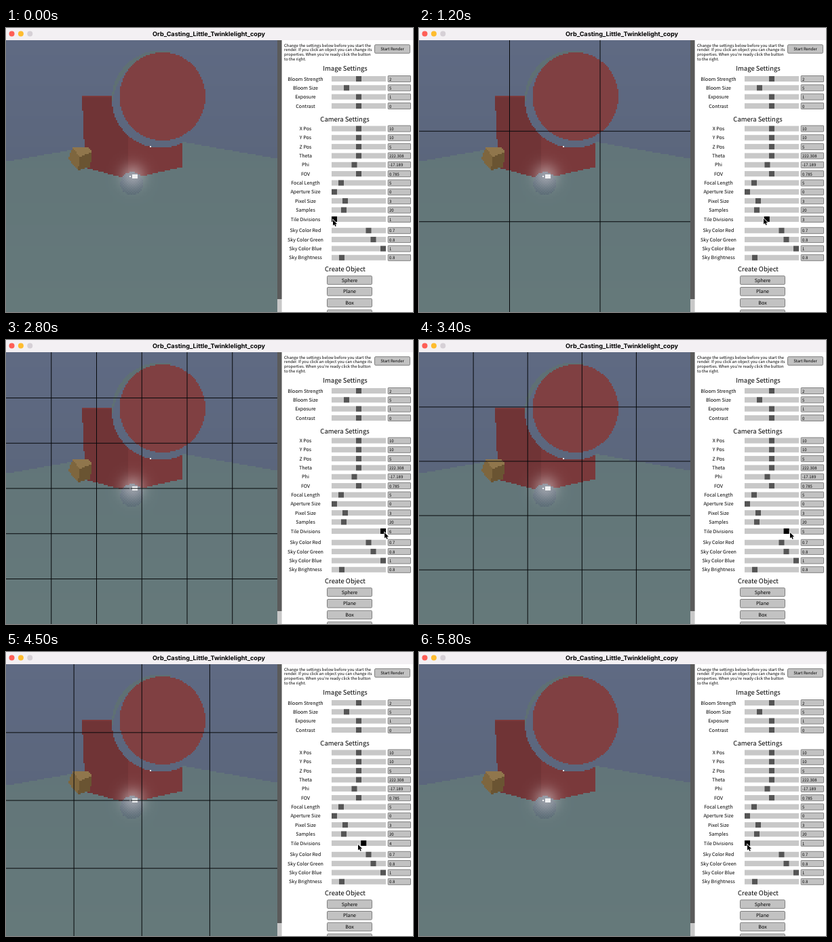
Write an HTML page with a canvas that moves like this. It is 600x419 px and loops after 5900 ms.

```html
<!DOCTYPE html>
<html lang="en">
<head>
<meta charset="utf-8">
<title>Render settings</title>
<style>
  html, body { margin: 0; width: 100%; height: 100%; overflow: hidden; background: #fff; }
  canvas { display: block; width: 600px; height: 419px; }
</style>
</head>
<body>
<canvas id="stage" width="600" height="419"></canvas>
<script>
const W = 600, H = 419, LOOP = 5900, STEP = 100;
const VIEW = 400, TOP = 18, CELL = 2;
const SANS = '"Noto Sans CJK JP", "Noto Sans CJK SC", "Noto Sans CJK", "Open Sans", sans-serif';
const TITLE = 'Orb_Casting_Little_Twinklelight_copy';
const TILE_Y = 282;

const ctx = document.getElementById('stage').getContext('2d');

// label, y, handle centre, value
const sliders = [
  ['Bloom Strength', 75, 520, '2'],
  ['Bloom Size', 88.3, 502, '5'],
  ['Exposure', 101.6, 520, '1'],
  ['Contrast', 115, 520, '0'],
  ['X Pos', 148.5, 520, '10'],
  ['Y Pos', 161.8, 520, '10'],
  ['Z Pos', 175.1, 520, '5'],
  ['Theta', 188.5, 520, '222.308'],
  ['Phi', 201.8, 513.5, '-17.189'],
  ['FOV', 215.1, 520, '0.785'],
  ['Focal Length', 228.5, 494, '5'],
  ['Aperture Size', 241.8, 484, '0'],
  ['Pixel Size', 255.1, 500, '3'],
  ['Samples', 268.5, 498, '20'],
  ['Sky Color Red', 298.8, 534.5, '0.7'],
  ['Sky Color Green', 312.1, 541.5, '0.8'],
  ['Sky Color Blue', 325.5, 556, '1'],
  ['Sky Brightness', 338.8, 495, '0.8']
];

// time, x, y of the pointer tip
const path = [
  [0, 482, 283], [1200, 508, 281], [2000, 536, 282], [2700, 558, 284],
  [2900, 558, 284], [3200, 550, 284], [3300, 548, 284], [3400, 547, 284],
  [4500, 519, 284], [5650, 484, 284], [LOOP, 484, 284]
];

const mix = (a, b, k) => a.map((v, i) => v + (b[i] - v) * k);
const inDisc = (x, y, cx, cy, rx, ry = rx) => Math.hypot((x - cx) / rx, (y - cy) / ry) < 1;
const inBox = (x, y, l, t, r, b) => x > l && x < r && y > t && y < b;

function inPoly(x, y, pts) {
  let inside = false;
  for (let i = 0, j = pts.length - 1; i < pts.length; j = i++) {
    const [ax, ay] = pts[i], [bx, by] = pts[j];
    if ((ay > y) !== (by > y) && x < (bx - ax) * (y - ay) / (by - ay) + ax) inside = !inside;
  }
  return inside;
}

const block = [[112, 100], [157, 100], [260, 130], [260, 205], [181, 223], [117, 206]];
const crate = [
  [[[92, 193], [98, 177], [109, 190], [106, 210]], [126, 102, 62]],
  [[[98, 177], [120, 175], [127, 183], [109, 190]], [144, 118, 76]],
  [[[109, 190], [127, 183], [124, 205], [106, 210]], [106, 84, 50]]
];

function surface(x, y) {
  const sky = mix([95, 106, 131], [91, 102, 124], (y - TOP) / 180);
  if (inDisc(x, y, 185.5, 229.5, 17)) {
    const dots = (Math.floor(x / CELL) + Math.floor(y / CELL)) % 2 ? 2 : -2;
    return mix([100, 112, 128], [88, 106, 115], (y - 213) / 34).map(v => v + dots);
  }
  if (inDisc(x, y, 230.7, 101, 63.3, 65)) return [128, 64, 66];
  if (inDisc(x, y, 228, 105, 72)) {
    return inDisc(x, y, 241, 120, 85) ? sky : [95, 112, 116];
  }
  for (const [pts, color] of crate) if (inPoly(x, y, pts)) return color;
  if (inPoly(x, y, block)) {
    if (y < 102) return [124, 58, 59];
    return x < 181 ? [112, 52, 54] : [122, 57, 59];
  }
  const horizon = 159.4 + Math.abs(x - 212) * 0.178;
  return y > horizon ? mix([98, 117, 121], [101, 121, 122], (y - 165) / 250) : sky;
}

function shade(x, y) {
  if (inBox(x, y, 186, 216, 194, 222) || inBox(x, y, 182, 218, 184, 220)) return [240, 241, 243];
  if (inDisc(x, y, 213, 175, 1.2)) return [250, 245, 245];
  const d = Math.hypot(x - 187, y - 218);
  return mix(surface(x, y), [226, 220, 222], 0.44 * Math.exp(-d * d / 330));
}

function renderScene() {
  const cols = VIEW / CELL, rows = cols + 1;
  const pic = document.createElement('canvas');
  pic.width = cols;
  pic.height = rows;
  const g = pic.getContext('2d');
  const img = g.createImageData(cols, rows);
  for (let r = 0; r < rows; r++) {
    for (let c = 0; c < cols; c++) {
      const color = shade((c + 0.5) * CELL, TOP + (r + 0.5) * CELL);
      img.data.set([...color.map(Math.round), 255], (r * cols + c) * 4);
    }
  }
  g.putImageData(img, 0, 0);
  return pic;
}

function rect(x, y, w, h, color) {
  ctx.fillStyle = color;
  ctx.fillRect(x, y, w, h);
}

function text(str, x, y, size, align = 'center', font = SANS, weight = 400) {
  ctx.font = `${weight} ${size}px ${font}`;
  ctx.textAlign = align;
  ctx.textRendering = 'geometricPrecision';
  ctx.fillStyle = '#000';
  ctx.fillText(str, x, y);
}

function panelBox(x, y, w, h, r) {
  ctx.beginPath();
  ctx.roundRect(x + 0.5, y + 0.5, w - 1, h - 1, r);
  ctx.fillStyle = '#c2c2c2';
  ctx.fill();
  ctx.strokeStyle = '#808080';
  ctx.lineWidth = 1;
  ctx.stroke();
}

function button(label, x, y, w, size) {
  panelBox(x, y, w, 13.5, 1.5);
  text(label, x + w / 2, y + 6.7 + size * 0.36, size);
}

function slider(label, y, handle, value, color = '#555') {
  const top = y - 4;
  text(label, 441.5, y + 2.5, 7.14);
  rect(480, top, 80, 8, '#c8c8c8');
  rect(handle - 4, top, 8, 8, color);
  panelBox(562.7, top - 1, 34.3, 10, 0.5);
  text(value, 565, y + 2.5, 5.95, 'left');
}

function drawPanel() {
  rect(400, TOP, 7, H - TOP, '#5a5a5a');
  rect(400, 400, 7, H - 400, '#c8c8c8');
  rect(406.6, TOP, W - 406.6, H - TOP, '#fff');
  [
    'Change the settings below before you start the',
    'render. If you click an object you can change its',
    'properties. When you\u2019re ready click the button',
    'to the right.'
  ].forEach((line, i) => text(line, 410, 27.6 + i * 6.67, 5.95, 'left'));
  button('Start Render', 543, 24.2, 53, 5.95);
  text('Image Settings', 500, 63.3, 9.5);
  text('Camera Settings', 499.5, 138.2, 9.5);
  text('Create Object', 500, 358.8, 9.5);
  sliders.forEach(s => slider(...s));
  ['Sphere', 'Plane', 'Box'].forEach((name, i) =>
    button(name, 473, 365.3 + i * 16.7, 67, 7.14));
  panelBox(473, 415.4, 67, 14, 1.5);
}

function drawTitleBar() {
  rect(0, 0, W, TOP, '#f3f0f3');
  ['#fe5f57', '#febc2e', '#d6d0d6'].forEach((color, i) => {
    ctx.beginPath();
    ctx.arc(8.5 + i * 13.4, 8.5, 4, 0, Math.PI * 2);
    ctx.fillStyle = color;
    ctx.fill();
  });
  text(TITLE, 299, 11.5, 9.1, 'center', 'Inter, "Open Sans", sans-serif', 700);
}

function pointerAt(t) {
  const i = Math.max(1, path.findIndex(p => p[0] >= t));
  const a = path[i - 1], b = path[i];
  const k = (t - a[0]) / (b[0] - a[0]);
  return [a[1] + (b[1] - a[1]) * k, a[2] + (b[2] - a[2]) * k];
}

// The slider trails the pointer by one step and snaps to whole tiles.
function tilesAt(t) {
  const [x] = pointerAt(Math.max(0, t - STEP));
  return Math.min(6, Math.max(1, 1 + Math.round((x - 484) / 14.4)));
}

function drawGrid(n) {
  for (let i = 1; i < n; i++) {
    const p = (VIEW + 0.5) * i / n - 0.5;
    rect(p, TOP, 1, H - TOP, '#07090b');
    rect(0, TOP + 0.75 + p, VIEW, 1, '#07090b');
  }
}

function drawPointer(x, y) {
  ctx.beginPath();
  [[0, 0], [0, 8.6], [2, 6.8], [3.3, 9.8], [4.8, 9.2], [3.5, 6.3], [6.2, 6.2]]
    .forEach(([dx, dy]) => ctx.lineTo(x + dx, y + dy));
  ctx.closePath();
  ctx.lineWidth = 1.4;
  ctx.strokeStyle = '#fff';
  ctx.stroke();
  ctx.fillStyle = '#000';
  ctx.fill();
}

const scene = renderScene();

function draw(now) {
  const t = Math.floor((now % LOOP) / STEP) * STEP;
  const n = tilesAt(t);
  ctx.imageSmoothingEnabled = false;
  ctx.drawImage(scene, 0, TOP, VIEW, scene.height * CELL);
  drawGrid(n);
  drawPanel();
  drawTitleBar();
  slider('Tile Divisions', TILE_Y, 484 + 14.4 * (n - 1), String(n), '#000');
  drawPointer(...pointerAt(t));
}

function tick() {
  draw(performance.now());
  requestAnimationFrame(tick);
}
tick();
</script>
</body>
</html>
```
